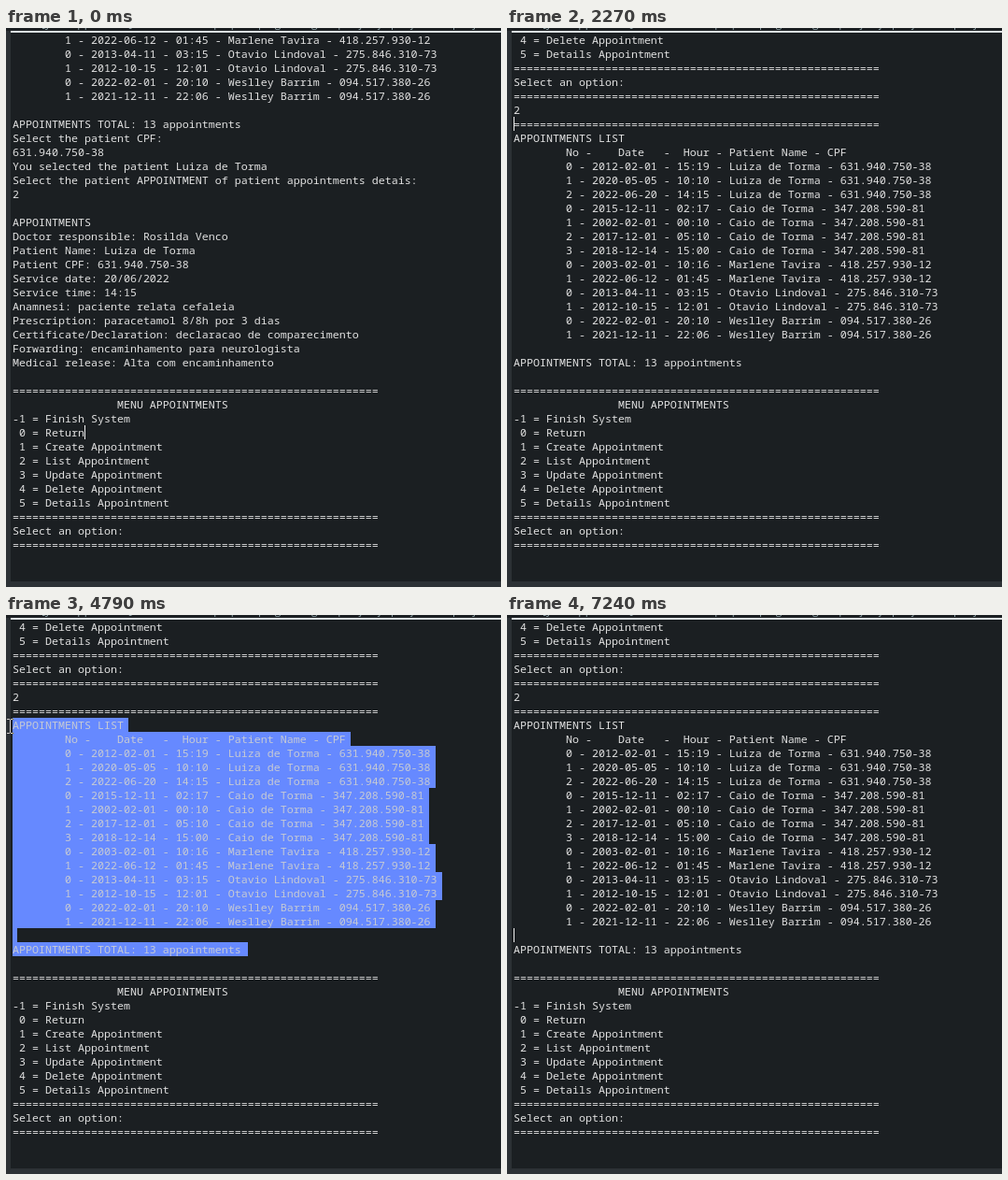
An HTML page that plays this animation: 530x598 px, repeating every 7390 ms.

```html
<!DOCTYPE html>
<html lang="en">
<head>
<meta charset="utf-8">
<title>Appointments console</title>
<style>
  html, body { margin: 0; width: 100%; height: 100%; overflow: hidden; background: #1b1f22; }
  #stage { position: relative; width: 530px; height: 598px; overflow: hidden; isolation: isolate; background: #2c3135; }
  #stage > * { position: absolute; }
  #title {
    left: 0; top: 0; width: 530px; height: 3px; overflow: hidden; background: #1b1f22;
    color: #8fa3a8; font: 12px/16px "Open Sans", sans-serif; white-space: nowrap;
  }
  #title span { position: absolute; left: 7px; top: -13px; }
  #console {
    left: 5px; top: 3px; width: 525px; height: 589px; box-sizing: border-box;
    background: #1b1f22; border-top: 2px solid #dadfe0;
  }
  #text {
    left: 7px; top: 5px; margin: 0; color: #e2e2e2;
    font: 11.6667px/15px "Noto Sans Mono", monospace; font-variant-ligatures: none;
  }
  #text div { height: 15px; white-space: pre; }
  #text mark {
    display: inline-block; height: 15px; vertical-align: top;
    background: #6689ff; color: #c6cad4;
  }
  #text mark.eol { padding-right: 5px; }
  #caret { width: 1px; height: 15px; background: #f0f0f0; }
  #mouse { mix-blend-mode: difference; }
</style>
</head>
<body>
<div id="stage">
  <div id="title"><span>Main [Java Application] C:\Users\user\.p2\pool\plugins\org.eclipse.justj.openjdk.hotspot.jre.full</span></div>
  <div id="console"></div>
  <pre id="text"></pre>
  <div id="caret"></div>
  <svg id="mouse" width="7" height="16" fill="none" stroke="#fff" shape-rendering="crispEdges">
    <path d="M0 .5H3M4 .5H7M3.5 1V15M0 15.5H3M4 15.5H7"/>
  </svg>
</div>
<script>
const LOOP = 7390, X0 = 7, Y0 = 5, CW = 7, LH = 15;
const $ = id => document.getElementById(id);
const rule = '='.repeat(56);

const visits = {
  'Luiza de Torma - 631.940.750-38': ['2012-02-01 - 15:19', '2020-05-05 - 10:10', '2022-06-20 - 14:15'],
  'Caio de Torma - 347.208.590-81': ['2015-12-11 - 02:17', '2002-02-01 - 00:10', '2017-12-01 - 05:10', '2018-12-14 - 15:00'],
  'Marlene Tavira - 418.257.930-12': ['2003-02-01 - 10:16', '2022-06-12 - 01:45'],
  'Otavio Lindoval - 275.846.310-73': ['2013-04-11 - 03:15', '2012-10-15 - 12:01'],
  'Weslley Barrim - 094.517.380-26': ['2022-02-01 - 20:10', '2021-12-11 - 22:06']
};
const list = Object.entries(visits).flatMap(([who, dates]) =>
  dates.map((date, i) => `        ${i} - ${date} - ${who}`));
const total = ['', `APPOINTMENTS TOTAL: ${list.length} appointments `];
const actions = ['Create', 'List', 'Update', 'Delete', 'Details'];
const menu = ['', rule, ' '.repeat(16) + 'MENU APPOINTMENTS',
  '-1 = Finish System', ' 0 = Return',
  ...actions.map((name, i) => ` ${i + 1} = ${name} Appointment`),
  rule, 'Select an option:', rule];

const lines = [
  ...list.slice(-5), ...total,
  'Select the patient CPF:', '631.940.750-38',
  'You selected the patient Luiza de Torma',
  'Select the patient APPOINTMENT of patient appointments detais:', '2', '',
  'APPOINTMENTS',
  'Doctor responsible: Rosilda Venco',
  'Patient Name: Luiza de Torma',
  'Patient CPF: 631.940.750-38',
  'Service date: 20/06/2022',
  'Service time: 14:15',
  'Anamnesi: paciente relata cefaleia',
  'Prescription: paracetamol 8/8h por 3 dias',
  'Certificate/Declaration: declaracao de comparecimento',
  'Forwarding: encaminhamento para neurologista',
  'Medical release: Alta com encaminhamento',
  ...menu, '2',
  rule, 'APPOINTMENTS LIST',
  '        No -    Date   -  Hour - Patient Name - CPF',
  ...list, ...total, ...menu
];

// Console states: scroll position, printed lines, caret cell and blink start
const scenes = [
  { t: 0, top: 0, count: 37, row: 28, col: 11, blink: -410 },
  { t: 1590, top: 0, count: 38, row: 37, col: 1 },
  { t: 2150, top: 1, count: 38, row: 37, col: 0 },
  { t: 2270, top: 32, count: lines.length, row: 6, col: 0, blink: 2140 },
  { t: 6040, top: 32, count: lines.length, row: 22, col: 0 }
];
const BLINK = 1020, BLINK_ON = 560;

const path = [
  { t: 3000, x: 485, y: 390 },
  { t: 3675, x: 262, y: 358 },
  { t: 3945, x: 245, y: 341 },
  { t: 4215, x: 80, y: 208 },
  { t: 4755, x: 4, y: 119 },
  { t: 5100, x: 4, y: 121 },
  { t: 5640, x: 300, y: 384 },
  { t: 5835, x: 317, y: 345 },
  { t: 6375, x: 317, y: 345 },
  { t: 7185, x: 485, y: 600 }
];
const STEP = 135, ENTER = 3000, LEAVE = 7240;
const PRESS = 3675, RELEASE = 5100, CLEAR = 6040;
const anchor = { row: 23, col: 36 };

function pointer(t) {
  const q = ENTER + Math.floor((t - ENTER) / STEP) * STEP;
  const i = path.findIndex(p => p.t > q);
  if (i < 0) return path[path.length - 1];
  const a = path[i - 1], b = path[i], k = (q - a.t) / (b.t - a.t);
  return { x: Math.round(a.x + (b.x - a.x) * k), y: Math.round(a.y + (b.y - a.y) * k) };
}

function cellAt({ x, y }, top) {
  const row = Math.floor((y - Y0) / LH);
  const col = Math.round((x - X0) / CW);
  return { row, col: Math.max(0, Math.min(col, lines[top + row].length)) };
}

function rowHtml(s, row, start) {
  if (!start || row < start.row || row > anchor.row) return s;
  const last = row === anchor.row;
  const a = row === start.row ? start.col : 0;
  const b = last ? anchor.col : s.length;
  if (last && a >= b) return s;
  return `${s.slice(0, a)}<mark${last ? '' : ' class="eol"'}>${s.slice(a, b)}</mark>${s.slice(b)}`;
}

function place(el, visible, x, y) {
  el.style.display = visible ? 'block' : 'none';
  el.style.left = x + 'px';
  el.style.top = y + 'px';
}

let shown = '';
function draw(t) {
  const scene = scenes.filter(s => s.t <= t).pop();
  const { top, count, row, col, blink = scene.t } = scene;
  const selecting = t >= PRESS && t < CLEAR;
  const start = selecting ? cellAt(pointer(Math.min(t, RELEASE)), top) : null;
  const html = lines.slice(top, count)
    .map((s, i) => `<div>${rowHtml(s, i, start)}</div>`).join('');
  if (html !== shown) $('text').innerHTML = shown = html;

  const lit = (t - blink) % BLINK < BLINK_ON;
  place($('caret'), lit && !selecting, X0 + col * CW, Y0 + row * LH);

  const inside = t >= ENTER && t < LEAVE;
  const { x, y } = inside ? pointer(t) : path[0];
  place($('mouse'), inside, x - 3, y - 8);
}

const t0 = performance.now();
function tick() {
  draw((performance.now() - t0) % LOOP);
  requestAnimationFrame(tick);
}
tick();
</script>
</body>
</html>
```
